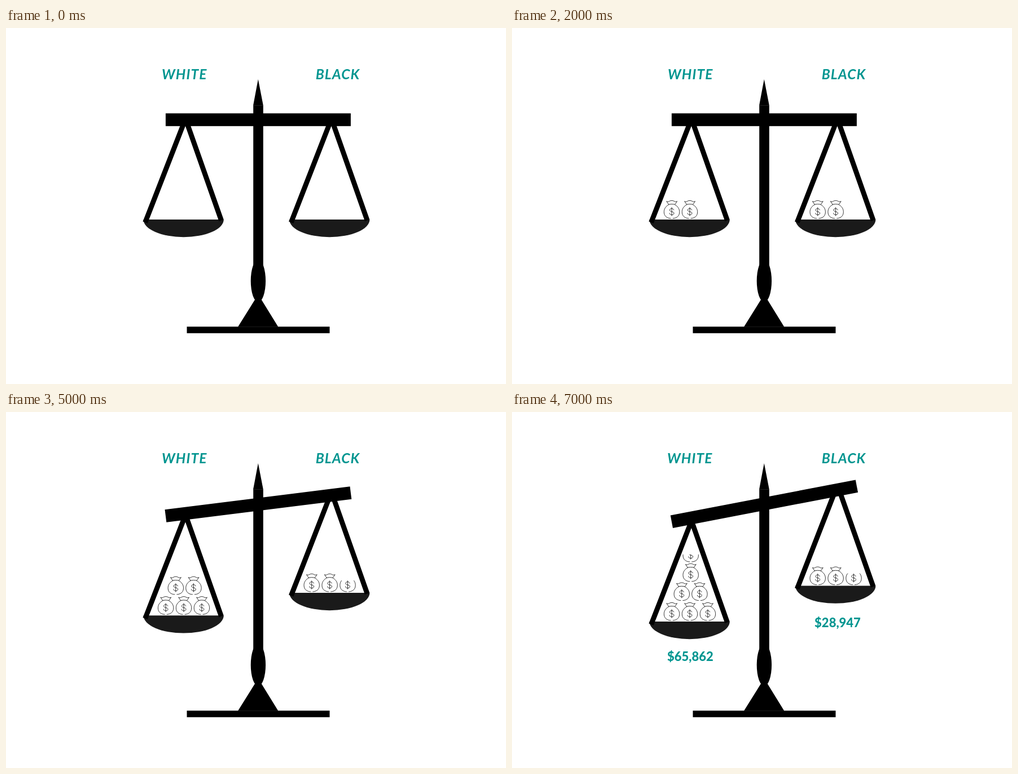
Animation, 886 px wide and 632 px high, one loop 8000 ms. Source, as an HTML page:

```html
<!DOCTYPE html>
<html lang="en">
<head>
<meta charset="utf-8">
<title>Balance</title>
<style>
html, body { margin: 0; width: 100%; height: 100%; overflow: hidden; background: #fff; }
svg { display: block; width: 100vw; height: 100vh; }
text { font-family: Lato, sans-serif; fill: #009590; text-anchor: middle; }
.name { font-size: 24.5px; font-weight: 700; font-style: italic; letter-spacing: 1.1px; }
.sum { font-size: 22px; font-weight: 800; }
.string { stroke: #000; stroke-width: 8.9; }
.bag path { fill: none; stroke: #111; stroke-width: .85; stroke-linecap: round; stroke-linejoin: round; }
</style>
</head>
<body>
<svg viewBox="0 0 886 632">
  <defs>
    <clipPath id="most"><rect x="-20" y="-8" width="40" height="30"/></clipPath>
    <clipPath id="half"><rect x="-20" y="-1" width="40" height="20"/></clipPath>
    <g id="bag" class="bag">
      <path d="M-5.5 -12.3C-10 -10 -13.7 -5.5 -13.7 .5C-13.7 8 -8.5 11.8 -2 12M2 12C8.5 11.8 13.7 8 13.7 .5C13.7 -5.5 10 -10 5.5 -12.3"/>
      <path d="M-5.5 -12.8L-9.3 -18.3C-7 -17.3 -5.5 -17.5 -3.8 -18.7C-1.5 -20 1.5 -20 3.8 -18.7C5.5 -17.5 7 -17.3 9.5 -18.3L5.7 -12.8Q0 -14 -5.5 -12.8"/>
      <path d="M3.6 -3C3 -4.8 1.5 -5.5 0 -5.5C-2 -5.5 -3.6 -4.5 -3.6 -2.8C-3.6 -1 -2 -.5 0 0C2.3 .5 3.9 1.2 3.9 3C3.9 4.8 2 5.6 0 5.6C-2.2 5.6 -3.7 4.7 -4 2.8M0 -7.4V7.4"/>
    </g>
    <g id="pan">
      <path d="M-73 340H69.3A71.1 31.2 0 0 1 -73 340Z" fill="#1a1a1a"/>
      <path class="string" d="M1.5 161.5L-69.9 345.2M1.7 161.5L65 341.5"/>
    </g>
  </defs>
  <rect width="886" height="632" fill="#fff"/>
  <path d="M446.8 91L455.8 137.5H438Z"/>
  <path d="M438.2 137.3H455.8V425H438.2Z"/>
  <ellipse cx="446.9" cy="449" rx="13.2" ry="37.5"/>
  <path d="M446.9 473L482.3 530.5H411Z"/>
  <rect x="320.5" y="530.2" width="253" height="11.6"/>
  <g id="left"><use href="#pan"/><g class="load"></g></g>
  <g id="right"><use href="#pan"/><g class="load"></g></g>
  <rect id="beam" height="22.7"/>
  <text id="white" class="name" x="316.3" y="91">WHITE</text>
  <text class="name" x="588" y="90.7">BLACK</text>
  <g id="sums">
    <text class="sum" x="315.8" y="442.3">$65,862</text>
    <text class="sum" x="577" y="381.7">$28,947</text>
  </g>
</svg>
<script>
const $ = id => document.getElementById(id);
const STEP = 1000, SPAN = 328, MID = 446.9;

// tilt in degrees, pan shifts, number of bags per side, label nudge
const steps = [
  { tilt: 0, drop: 0, rise: 0, l: 0, r: 0, nudge: 0 },
  { tilt: 0, drop: 0, rise: 0, l: 1, r: 1, nudge: 0 },
  { tilt: 0, drop: 0, rise: 0, l: 2, r: 2, nudge: 0 },
  { tilt: 1.95, drop: 5.7, rise: 5.7, l: 3, r: 3, nudge: 0 },
  { tilt: 4.3, drop: 12.2, rise: 12.2, l: 4, r: 3, nudge: 0 },
  { tilt: 7.1, drop: 21.3, rise: 19, l: 5, r: 3, nudge: 0 },
  { tilt: 9.15, drop: 26.4, rise: 26, l: 6, r: 3, nudge: -.5 },
  { tilt: 10.9, drop: 32, rise: 31.4, l: 7, r: 3, nudge: -1 }
];

// bag places relative to the pan, filled row by row
const places = [
  [-33.4, 0], [-1.5, 0], [30.4, 0],
  [-15.7, -35.4], [15.9, -35.4],
  [.2, -69.2], [.2, -104]
];

function fill(side, cut, clip) {
  const load = document.querySelector(`#${side} .load`);
  load.innerHTML = places.map(([x, y], i) => {
    const attr = i === cut ? ` clip-path="url(#${clip})"` : "";
    return `<g transform="translate(${x} ${326 + y})"><g${attr}><use href="#bag"/></g></g>`;
  }).join("");
  return [...load.children];
}

const leftBags = fill("left", 6, "half");
const rightBags = fill("right", 2, "most");
const show = (bags, n) => bags.forEach((b, i) => b.style.display = i < n ? "" : "none");

// the beam stretches with its tilt so that it keeps its horizontal span
function tiltBeam({ tilt, drop, rise }) {
  const w = SPAN / Math.cos(tilt * Math.PI / 180);
  const y = 162.85 + (drop - rise) / 2;
  const beam = $("beam");
  beam.setAttribute("x", MID - w / 2);
  beam.setAttribute("y", y - 11.35);
  beam.setAttribute("width", w);
  beam.setAttribute("transform", `rotate(${-tilt} ${MID} ${y})`);
}

let last = -1;
function draw(t) {
  const k = Math.floor(t / STEP) % steps.length;
  if (k === last) return;
  last = k;
  const s = steps[k];
  tiltBeam(s);
  $("left").setAttribute("transform", `translate(316.5 ${s.drop})`);
  $("right").setAttribute("transform", `translate(575.1 ${-s.rise})`);
  $("white").setAttribute("transform", `translate(${s.nudge})`);
  $("sums").style.display = k === steps.length - 1 ? "" : "none";
  show(leftBags, s.l);
  show(rightBags, s.r);
}

const start = performance.now();
function loop() {
  draw(performance.now() - start);
  requestAnimationFrame(loop);
}
loop();
</script>
</body>
</html>
```
